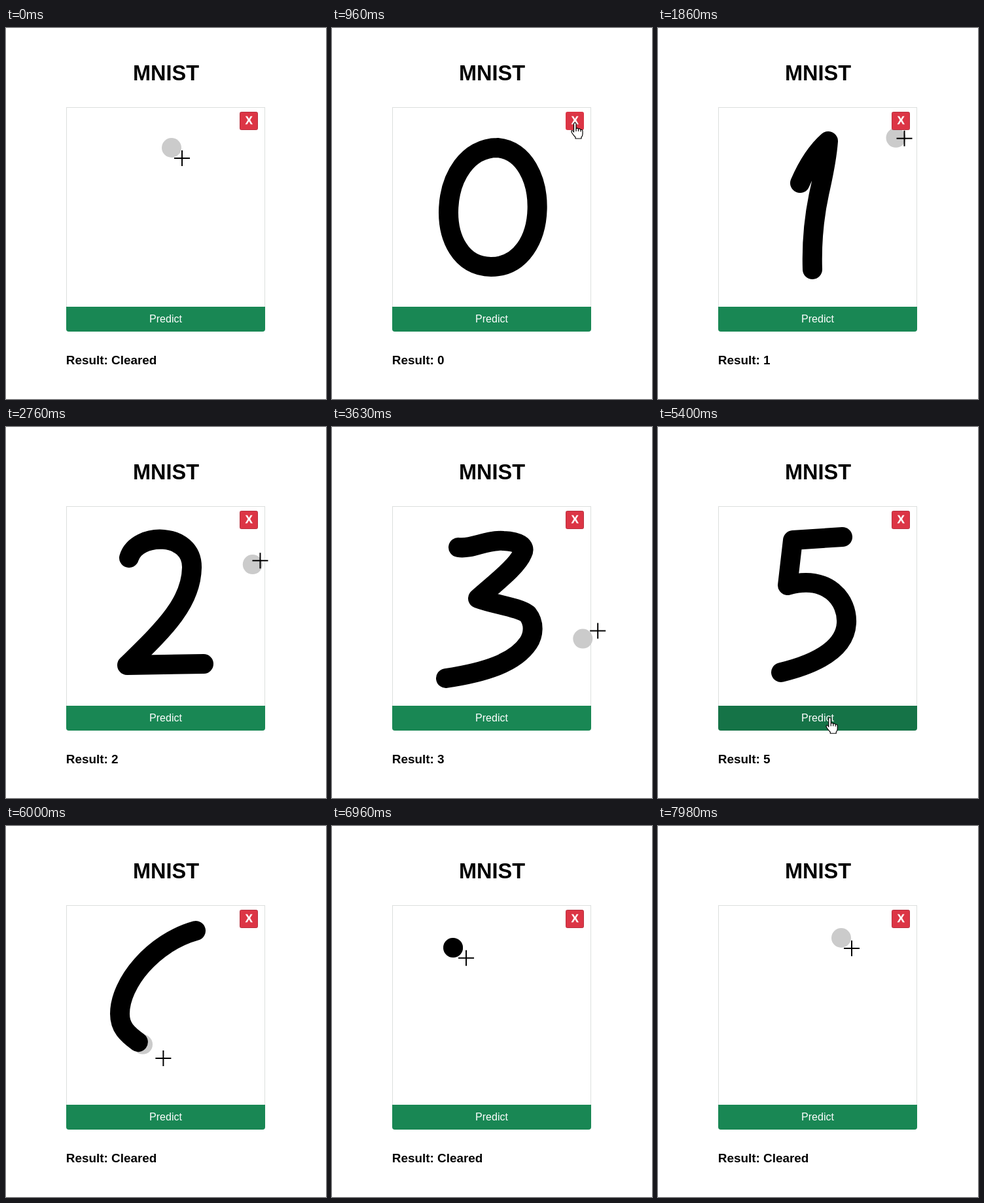
An HTML page that plays this animation: 489 by 567 pixels, repeating every 8 s.

```html
<!DOCTYPE html>
<html lang="en">
<head>
<meta charset="utf-8">
<title>MNIST</title>
<style>
  html, body { margin: 0; width: 100%; height: 100%; overflow: hidden; background: #fff; }
  svg { display: block; width: 100%; height: 100%; font-family: "Liberation Sans", Arial, sans-serif; }
  .bold { font-weight: 700; }
  .mid { text-anchor: middle; }
  .ink path { fill: none; stroke: #000; stroke-width: 30; stroke-linecap: round; stroke-linejoin: round; }
</style>
</head>
<body>
<svg viewBox="0 0 489 567">
  <text class="bold mid" x="244.5" y="79.5" font-size="32.5">MNIST</text>
  <rect x="92.5" y="121.5" width="303" height="305" fill="#fff" stroke="#dcdfde"/>
  <g class="ink" id="ink"></g>
  <path id="predict" d="M92 426H396V460Q396 464 392 464H96Q92 464 92 460Z"/>
  <text class="mid" x="244" y="450" font-size="16" fill="#fff">Predict</text>
  <rect id="clear" x="357.5" y="128.5" width="27" height="27" rx="2" fill="#dc3545"/>
  <text class="bold mid" x="371.3" y="147" font-size="16.5" fill="#fff" stroke="#fff" stroke-width=".4">X</text>
  <text class="bold" id="result" x="91.8" y="513.5" font-size="18.9"></text>
  <path id="cross" d="M-12 0H12M0 -12V12" stroke="#000" stroke-width="2"/>
  <g id="hand" stroke="#000" stroke-width="1.2" stroke-linejoin="round">
    <path fill="#fff" d="M-1.5 1Q0 -1.5 2 1V9Q4 7 5.5 9.5Q8 8 9 10.5Q12 9.5 12 13V17Q12 20 10 22V24H1V22Q-2 19 -4.5 15Q-6 12 -4 11.5Q-3 11.500 -1.5 14Z"/>
    <path fill="none" d="M2 9V13M5.5 9.5V13M9 10.500V13.5"/>
  </g>
</svg>
<script>
const LOOP = 8000, SPEED = 1.35, LEAD = 12, INK_LAG = 6, OFFSET = 16;
const PREDICT = '244 429', CLEAR = '355 129', NEXT_START = '280 171';
const $ = id => document.getElementById(id);

// Each digit: the time it is wiped, then its pen strokes.
const DIGITS = [
  [1000, 'M253 183C160 183 150 365 243 365S335 190 253 183'],
  [1955, 'M217 237Q235 195 260 173Q258 200 248 245Q234 305 236 369'],
  [2880, 'M188 200C200 160 285 160 284 215C283 270 240 310 185 364L302 362'],
  [3800, 'M193 184C215 187 235 172 262 174C285 175 297 182 291 193C283 213 250 238 223 262' +
         'C250 272 285 275 299 286C310 300 308 318 300 330C280 360 235 375 174 384'],
  [4840, 'M233 166C195 200 173 225 173 257C174 300 240 300 287 281', 'M282 226C268 290 254 315 256 396'],
  [5690, 'M282 168L206 173L198 242C260 225 290 265 288 300S250 360 188 375'],
  [6840, 'M290 160C225 178 174 240 174 287C174 308 185 318 203 331C260 360 300 320 270 288S215 290 205 322'],
  [7860, 'M185 186L300 176C295 220 255 290 238 382'],
];

const moves = [], inks = [], results = [[0, 'Cleared']];
const linear = p => p;
const easeInOut = p => (1 - Math.cos(Math.PI * p)) / 2;

function addMove(start, end, d, ease = easeInOut) {
  const path = document.createElementNS('http://www.w3.org/2000/svg', 'path');
  path.setAttribute('d', d);
  const length = path.getTotalLength();
  const move = { start, end: end || start + length / SPEED, path, length, ease };
  moves.push(move);
  return move;
}

let free = -80, spot = '253 183';
function glideTo(target, start, end, via = '') {
  addMove(start, end, `M${spot}${via ? `Q${via} ` : 'L'}${target}`);
  spot = target;
}

// Draw at steady speed, press Predict, swing out to the right, press X.
DIGITS.forEach(([clearAt, ...strokes], digit) => {
  const pressAt = clearAt - 330;
  const swing = 466 - 25 * Math.abs(digit - 3);
  let start = free + 130;
  for (const d of strokes) {
    glideTo(d.match(/M(\d+ \d+)/)[1], free + 20, start - 40);
    const stroke = addMove(start, 0, d, linear);
    $('ink').append(stroke.path);
    inks.push({ ...stroke, clearAt });
    spot = d.match(/(\d+ \d+)$/)[1];
    free = stroke.end;
    start = free + 90;
  }
  glideTo(PREDICT, free, pressAt - 20);
  glideTo(CLEAR, pressAt + 40, clearAt - 40, `${swing} 371`);
  results.push([pressAt + 30, digit], [clearAt, 'Cleared']);
  free = clearAt;
});
glideTo(NEXT_START, free + 20, free + 120);

const clamp = v => Math.max(0, Math.min(1, v));
const covered = (m, t) => m.length * m.ease(clamp((t - m.start) / (m.end - m.start)));

function brushAt(t) {
  const move = moves.find(m => t < m.end) || moves[moves.length - 1];
  return move.path.getPointAtLength(covered(move, t));
}

const show = (el, on) => el.setAttribute('visibility', on ? 'visible' : 'hidden');
const place = (el, x, y) => el.setAttribute('transform', `translate(${x} ${y})`);
const inside = (x, y, l, t, r, b) => x >= l && x <= r && y >= t && y <= b;

const brush = document.createElementNS('http://www.w3.org/2000/svg', 'circle');
brush.setAttribute('r', 15);
brush.setAttribute('fill', '#cbcbcb');
$('ink').prepend(brush);

function render(t) {
  const at = brushAt(t), ahead = brushAt(t + LEAD);
  const x = ahead.x + OFFSET, y = ahead.y + OFFSET;
  const onClear = inside(x, y, 357, 128, 385, 156);
  const onPredict = inside(x, y, 92, 426, 396, 464);
  const hover = onClear || onPredict;

  place(brush, at.x, at.y);
  place($('cross'), x, y);
  place($('hand'), x, y);
  show(brush, !hover);
  show($('cross'), !hover);
  show($('hand'), hover);
  $('predict').setAttribute('fill', onPredict ? '#157347' : '#198754');
  $('clear').setAttribute('stroke', onClear ? '#dc3545' : '#b93140');

  for (const ink of inks) {
    show(ink.path, t >= ink.start - 35 && t < ink.clearAt);
    const drawn = Math.max(0.1, covered(ink, t - INK_LAG));
    ink.path.setAttribute('stroke-dasharray', `${drawn} 2000`);
  }
  $('result').textContent = 'Result: ' + results.filter(r => r[0] <= t).pop()[1];
}

const origin = performance.now();
function tick() {
  render((performance.now() - origin) % LOOP);
  requestAnimationFrame(tick);
}
tick();
</script>
</body>
</html>
```
